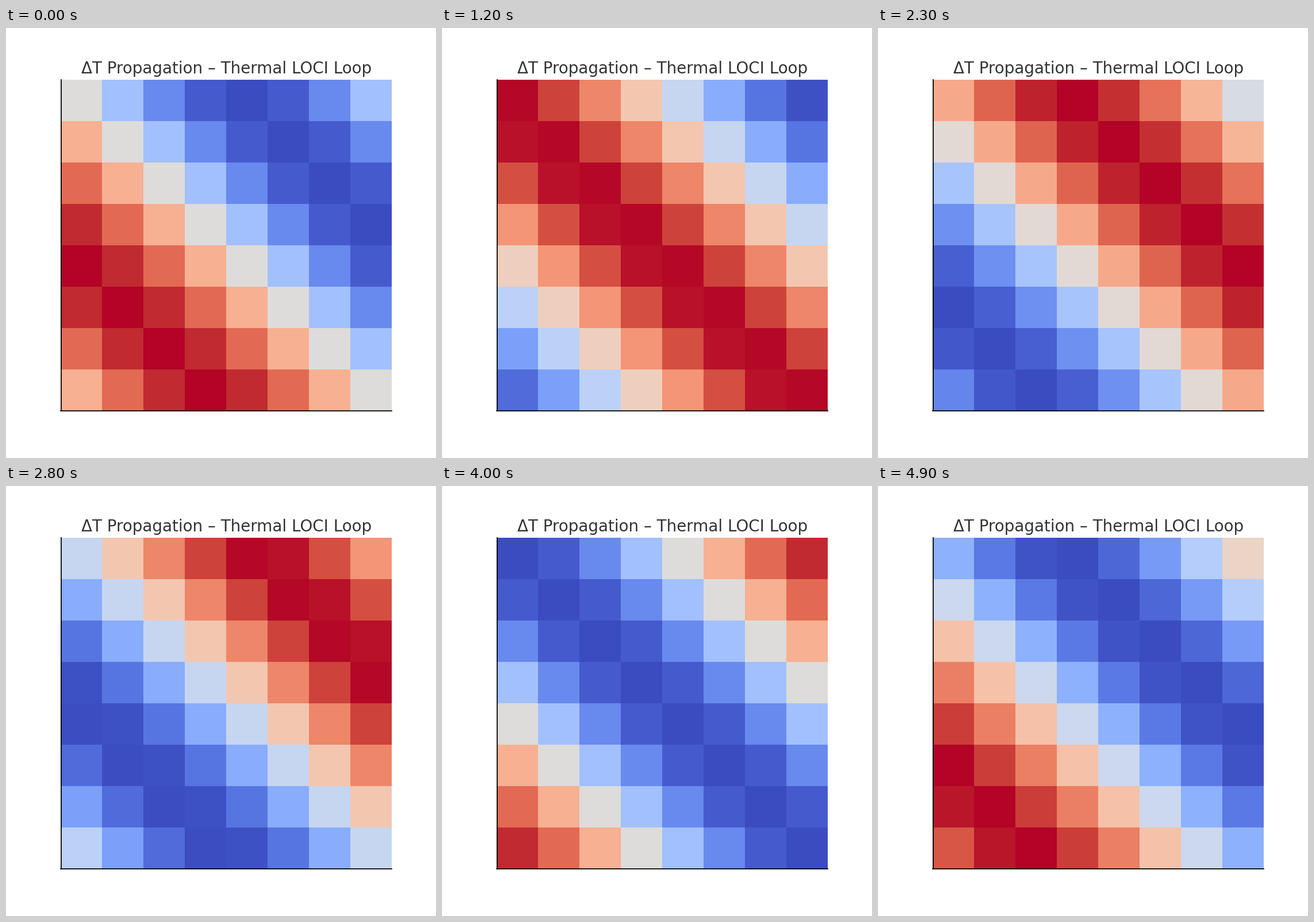
Write a matplotlib script that moves like this. It is 748 px wide and 748 px high and loops after 5 s.

```python
import numpy as np
import matplotlib.pyplot as plt
from matplotlib.animation import FuncAnimation

STAGE, INCHES = 748, 6
FRAMES, INTERVAL = 50, 100
CELLS = 8
DRIFT = 0.3  # cells the wave travels per frame

plt.rcParams["font.family"] = "DejaVu Sans"

rows, cols = np.indices((CELLS, CELLS))


def heat(frame):
    """Diagonal sine wave with a wavelength of two grid widths."""
    return np.sin((rows - cols + DRIFT * frame) * np.pi / CELLS)


fig, ax = plt.subplots(figsize=(INCHES, INCHES), dpi=STAGE / INCHES, facecolor="white")
image = ax.imshow(heat(0), cmap="coolwarm", vmin=-1, vmax=1, interpolation="nearest")
ax.set_title("ΔT Propagation – Thermal LOCI Loop", fontsize=16, color="#333333")

ax.spines[["top", "right"]].set_visible(False)
ax.spines["left"].set_position(("outward", -0.4))
for side in ("left", "bottom"):
    ax.spines[side].set(linewidth=1, color="black")
ax.set(xticks=[], yticks=[])


def update(frame):
    image.set_data(heat(frame))
    return [image]


anim = FuncAnimation(fig, update, frames=FRAMES, interval=INTERVAL,
                     repeat=True, repeat_delay=0, blit=False)
plt.show()
```
